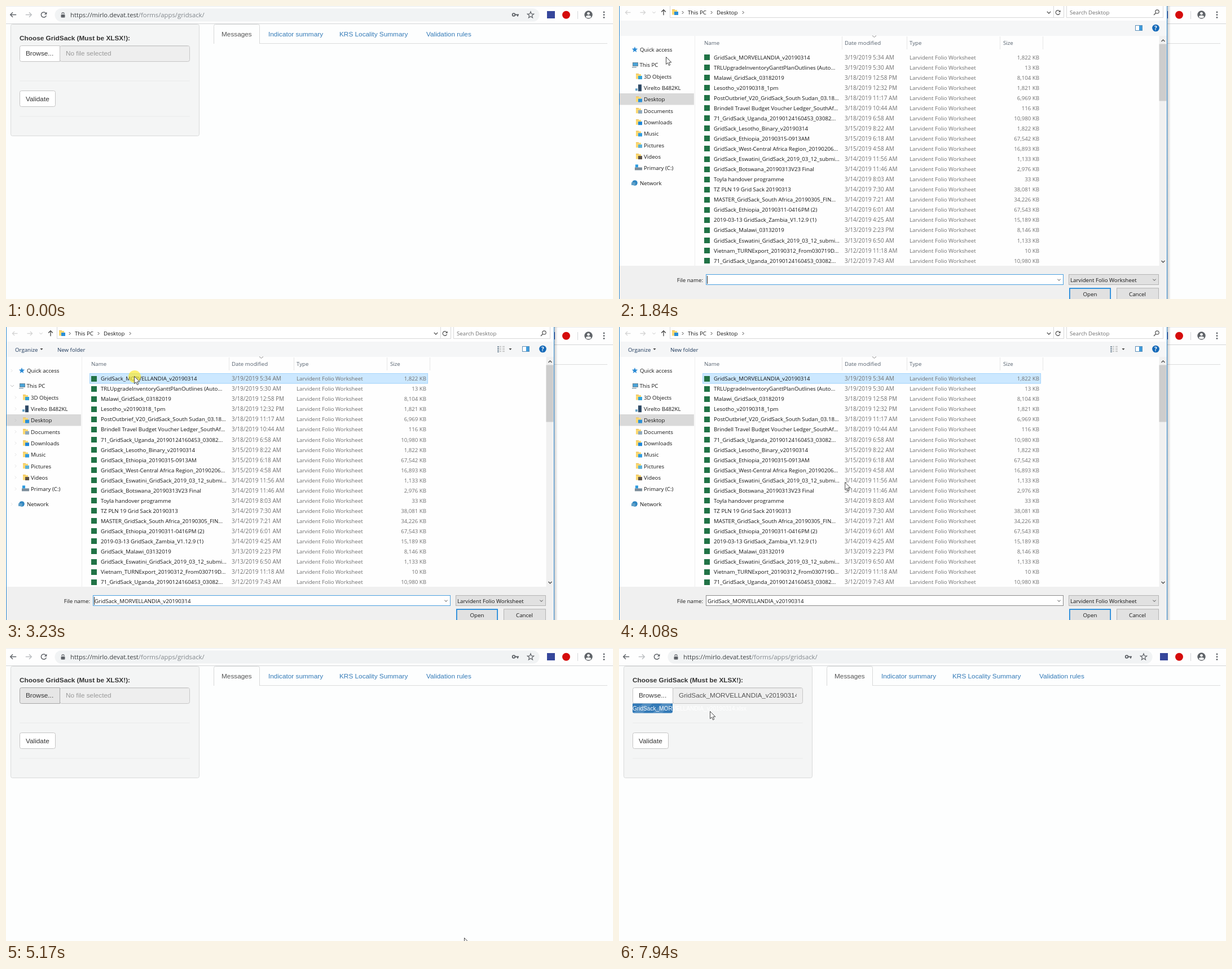
An HTML page with a canvas that plays this animation: 1076 px wide and 520 px high, repeating every 8000 ms.

```html
<!DOCTYPE html>
<html lang="en">
<head>
<meta charset="utf-8">
<title>Upload walkthrough</title>
<style>
html, body { margin: 0; width: 100%; height: 100%; overflow: hidden; background: #fdfefe; }
canvas { display: block; }
</style>
</head>
<body>
<canvas id="stage" width="1076" height="520"></canvas>
<script>
const ctx = document.getElementById('stage').getContext('2d');
const LOOP = 8000;
const ARIAL = '"Liberation Sans", Arial, sans-serif';
const UI = '"Open Sans", "Noto Sans", sans-serif';
const PAGE = '11.8px ' + ARIAL;
const SMALL = '9.7px ' + UI;
const INK = '#161616';
const GREY = '#707070';
const BLUE = '#0078d7';
const FILE = 'GridSack_MORVELLANDIA_v20190314';
const KIND = 'Larvident Folio Worksheet';

const FILES = `${FILE}|3/19/2019 5:34 AM|1,822
TRLUpgradeInventoryGanttPlanOutlines (Auto...|3/19/2019 5:30 AM|13
Malawi_GridSack_03182019|3/18/2019 12:58 PM|8,104
Lesotho_v20190318_1pm|3/18/2019 12:32 PM|1,821
PostOutbrief_V20_GridSack_South Sudan_03.18...|3/18/2019 11:17 AM|6,969
Brindell Travel Budget Voucher Ledger_SouthAf...|3/18/2019 10:44 AM|116
71_GridSack_Uganda_20190124160453_03082...|3/18/2019 6:58 AM|10,980
GridSack_Lesotho_Binary_v20190314|3/15/2019 8:22 AM|1,822
GridSack_Ethiopia_20190315-0913AM|3/15/2019 6:18 AM|67,542
GridSack_West-Central Africa Region_20190206...|3/15/2019 4:58 AM|16,893
GridSack_Eswatini_GridSack_2019_03_12_submi...|3/14/2019 11:56 AM|1,133
GridSack_Botswana_20190313V23 Final|3/14/2019 11:46 AM|2,976
Toyla handover programme|3/14/2019 8:03 AM|33
TZ PLN 19 Grid Sack 20190313|3/14/2019 7:30 AM|38,081
MASTER_GridSack_South Africa_20190305_FIN...|3/14/2019 7:21 AM|34,226
GridSack_Ethiopia_20190311-0416PM (2)|3/14/2019 6:01 AM|67,543
2019-03-13 GridSack_Zambia_V1.12.9 (1)|3/14/2019 4:25 AM|15,189
GridSack_Malawi_03132019|3/13/2019 2:23 PM|8,146
GridSack_Eswatini_GridSack_2019_03_12_submi...|3/13/2019 6:50 AM|1,133
Vietnam_TURNExport_20190312_From030719D...|3/12/2019 11:18 AM|10
71_GridSack_Uganda_20190124160453_03082...|3/12/2019 7:43 AM|10,980`
  .split('\n').map(row => row.split('|'));

const FOLDERS = [
  ['3D Objects', '#35a3d8'], ['Virelto B482KL', '#2f4a66'], ['Desktop', '#2b8fd6'],
  ['Documents', '#8fa9bd'], ['Downloads', '#1f86d8'], ['Music', '#2f9be0'],
  ['Pictures', '#59b0d9'], ['Videos', '#5a5148'], ['Primary (C:)', '#7b8c99']
];

// Drawing helpers
function rect(x, y, w, h, fill, stroke, lw = 1) {
  if (fill) { ctx.fillStyle = fill; ctx.fillRect(x, y, w, h); }
  if (stroke) {
    ctx.strokeStyle = stroke; ctx.lineWidth = lw;
    ctx.strokeRect(x + lw / 2, y + lw / 2, w - lw, h - lw);
  }
}
function round(x, y, w, h, r, fill, stroke) {
  ctx.beginPath();
  ctx.roundRect(x + .5, y + .5, w - 1, h - 1, r);
  if (fill) { ctx.fillStyle = fill; ctx.fill(); }
  if (stroke) { ctx.strokeStyle = stroke; ctx.lineWidth = 1; ctx.stroke(); }
}
function circle(x, y, r, fill, stroke, lw = 1) {
  ctx.beginPath();
  ctx.arc(x, y, r, 0, 7);
  if (fill) { ctx.fillStyle = fill; ctx.fill(); }
  if (stroke) { ctx.strokeStyle = stroke; ctx.lineWidth = lw; ctx.stroke(); }
}
function line(color, lw, ...p) {
  ctx.beginPath();
  for (let i = 0; i < p.length; i += 2) ctx.lineTo(p[i], p[i + 1]);
  ctx.strokeStyle = color; ctx.lineWidth = lw; ctx.stroke();
}
function poly(fill, ...p) {
  ctx.beginPath();
  for (let i = 0; i < p.length; i += 2) ctx.lineTo(p[i], p[i + 1]);
  ctx.closePath();
  ctx.fillStyle = fill; ctx.fill();
}
function text(s, x, y, font, color, align = 'left') {
  ctx.font = font; ctx.fillStyle = color; ctx.textAlign = align;
  ctx.fillText(s, x, y);
}
function clipped(x, y, w, h, draw) {
  ctx.save();
  ctx.beginPath(); ctx.rect(x, y, w, h); ctx.clip();
  draw();
  ctx.restore();
}
function star(x, y, r) {
  ctx.beginPath();
  for (let i = 0; i < 10; i++) {
    const a = -Math.PI / 2 + i * Math.PI / 5, d = i % 2 ? r * .43 : r;
    ctx.lineTo(x + d * Math.cos(a), y + d * Math.sin(a));
  }
  ctx.closePath();
}
const down = (x, y, c, s = 3, lw = 1) => line(c, lw, x - s, y - s / 2, x, y + s / 2, x + s, y - s / 2);
const right = (x, y, c, s = 2.5, lw = 1) => line(c, lw, x - s / 2, y - s, x + s / 2, y, x - s / 2, y + s);
function arrow(x, y, dx, dy, len, c, lw = 1.3) {
  const h = len * .8;
  line(c, lw, x - dx * len, y - dy * len, x + dx * len, y + dy * len);
  const tx = x + dx * len, ty = y + dy * len;
  line(c, lw, tx - dx * h - dy * h, ty - dy * h - dx * h, tx, ty, tx - dx * h + dy * h, ty - dy * h + dx * h);
}
function reload(x, y, r, c, lw) {
  ctx.beginPath(); ctx.arc(x, y, r, .3, 5.5);
  ctx.strokeStyle = c; ctx.lineWidth = lw; ctx.stroke();
  poly(c, x + r + .8, y - r - .5, x + r + .8, y - .4, x + .8, y - .4);
}

// Progress from a to b in n even jumps
function step(t, a, b, n) {
  return t < a ? 0 : Math.min(n, Math.floor((t - a) * (n - 1) / (b - a) + 1.2)) / n;
}
const linear = p => p;
const smooth = p => p * p * (3 - 2 * p);
const easeOut = k => p => 1 - Math.pow(1 - p, k);
const easeIn = k => p => Math.pow(p, k);

// start, end, jumps, goal x and y, easing of x and y
const MOVES = [
  [300, 440, 3, 170, 146, linear, linear],
  [760, 1370, 9, 83, 90, smooth, smooth],
  [2390, 2710, 5, 227, 87, smooth, smooth],
  [4000, 4790, 11, 812, 514, easeOut(1.75), easeOut(2.9)],
  [6630, 7940, 18, 161, 112, easeIn(2.26), easeIn(2.6)]
];
function pointer(t) {
  let x = 577, y = 394;
  for (const [a, b, n, goalX, goalY, easeX, easeY] of MOVES) {
    const p = step(t, a, b, n);
    x += (goalX - x) * easeX(p);
    y += (goalY - y) * easeY(p);
  }
  return { x, y };
}
const inside = (c, x, y, w, h) => c.x >= x && c.x < x + w && c.y >= y && c.y < y + h;

function drawPointer({ x, y }) {
  ctx.beginPath();
  [[0, 0], [0, 13], [3, 10.2], [5, 15], [7.2, 14.1], [5.2, 9.5], [9.3, 9.5]]
    .forEach(([a, b]) => ctx.lineTo(x + a + .5, y + b + .5));
  ctx.closePath();
  ctx.fillStyle = '#fff'; ctx.fill();
  ctx.strokeStyle = '#333'; ctx.lineWidth = .9; ctx.stroke();
}

function browserBar() {
  const ink = '#5f6368';
  rect(0, 0, 1076, 31, '#fefefe');
  rect(0, 0, 1076, 1, '#e9ebed');
  rect(0, 31, 1076, 1, '#d3d5d6');
  arrow(13, 15.5, -1, 0, 5.2, ink, 1.5);
  arrow(40, 15.5, 1, 0, 5.2, '#bcbfc2', 1.5);
  reload(67, 15.5, 4.6, ink, 1.5);
  round(86, 4, 860, 24, 12, '#f1f3f4');
  round(97, 14.5, 8, 6.5, 1, ink);
  ctx.beginPath(); ctx.arc(101, 14, 2.2, Math.PI, 0);
  ctx.strokeStyle = ink; ctx.lineWidth = 1.2; ctx.stroke();
  const font = '11.3px ' + UI, host = 'https://mirlo.devat.test';
  text(host, 114, 20, font, '#3c4043');
  text('/forms/apps/gridsack/', 114 + ctx.measureText(host).width, 20, font, '#80868b');
  circle(900, 15.5, 2.3, null, ink, 1.8);
  line(ink, 2, 902, 15.5, 909, 15.5);
  line(ink, 2, 907, 15.5, 907, 18.5);
  star(930, 16, 6);
  ctx.strokeStyle = ink; ctx.lineWidth = 1.2; ctx.stroke();
  rect(959, 9, 14, 13, '#36479b');
  circle(993, 15.7, 7, '#d50b0b');
  rect(1013, 9, 1, 14, '#d5d7d9');
  circle(1032.5, 15.5, 7.2, ink);
  circle(1032.5, 13.3, 2.4, '#fff');
  ctx.beginPath(); ctx.ellipse(1032.5, 19, 4.4, 2.2, 0, 0, 7);
  ctx.fillStyle = '#fff'; ctx.fill();
  for (let i = 0; i < 3; i++) circle(1060, 11 + i * 4.7, 1.4, ink);
}

function progress(t) {
  const p = step(t, 5790, 7940, 29), now = 5790 + p * 2150;
  const w = p < .38 ? p / .38 * 23 : 23 + (p - .38) / .62 * 48;
  const label = () => text(FILE + '.xlsx', 24, 110.5, '10.1px ' + ARIAL, '#fff');
  label();
  ctx.save();
  ctx.beginPath(); ctx.roundRect(24, 98.5, w, 17, [0, 0, 3, 3]); ctx.clip();
  rect(24, 98, w, 18, '#337ab7');
  const shift = 34 - now / 2000 * 34 % 34;
  for (let x = -34; x < w + 40; x += 34) {
    const s = 24 + x + shift;
    poly('rgba(255,255,255,.15)', s, 116, s + 17, 116, s + 35, 98, s + 18, 98);
  }
  label();
  ctx.restore();
}

function page(t, c) {
  rect(0, 0, 1076, 520, '#fdfefe');
  browserBar();
  round(8, 32, 335, 199, 3, '#f4f5f5', '#d9dada');
  text('Choose GridSack (Must be XLSX!):', 24, 61, 'bold ' + PAGE, '#333');

  round(95, 70, 231, 29, 3, '#eeeeee', '#c6c6c6');
  rect(96, 71, 229, 1, '#dfdfdf');
  const loaded = t >= 5400;
  clipped(96, 70, 219, 29, () =>
    text(loaded ? FILE + '.xlsx' : 'No file selected', 106, 88, PAGE, loaded ? '#555' : '#999'));

  const hot = t < 1690 ? inside(c, 24, 70, 71, 29) : t < 6630;
  round(24, 70, 72, 29, [3, 0, 0, 3], hot ? '#e6e6e6' : '#fff', hot ? '#a6a6a6' : '#c4c4c4');
  text('Browse...', 35, 88, PAGE, '#333');
  if (t >= 5790) progress(t);

  rect(24, 132.5, 302, 1, '#ececec');
  rect(24, 195.5, 302, 1, '#ececec');
  round(24, 150, 64, 29, 3, '#fff', '#c4c4c4');
  text('Validate', 35, 168.7, PAGE, '#333');

  rect(368, 66, 698, 1, '#dcdddd');
  round(368, 32, 82, 40, 3, '#fdfefe', '#d7d8d8');
  rect(367, 67, 84, 6, '#fdfefe');
  text('Messages', 382, 53.7, PAGE, '#555');
  text('Indicator summary', 465, 53.7, PAGE, '#337ab7');
  text('KRS Locality Summary', 591, 53.7, PAGE, '#337ab7');
  text('Validation rules', 745, 53.7, PAGE, '#337ab7');
}

function folder(x, y, accent) {
  rect(x, y - 5, 5, 2, '#e9b949');
  rect(x, y - 4, 9, 8.5, '#fbd871');
  rect(x + 4, y - 1, 7, 6, accent);
}

function tree(alpha) {
  const item = (s, x, y) => text(s, x, y + 3.7, SMALL, INK);
  rect(1, 155, 132, 20.5, '#d9d9d9');
  star(28, 77.5, 5.5);
  ctx.fillStyle = '#2a8ad4'; ctx.fill();
  item('Quick access', 37, 77.5);
  rect(24, 100, 10, 7, '#4aa3d8', '#6c8797');
  rect(23, 108, 8, 1.5, '#8ea3b0');
  item('This PC', 36.5, 104.5);
  FOLDERS.forEach(([name, color], i) => {
    const y = 125 + i * 20.3;
    if (i === 1) { rect(34, y - 6, 6, 12, color); rect(29, y + 1, 4, 4, '#68a4c8'); }
    else if (i === 8) { rect(28, y - 1, 13, 5, color); rect(29, y - 6, 5, 5, '#2b9be0'); }
    else folder(30, y, color);
    item(name, 44, y);
  });
  circle(28, 314, 4.8, '#2f86c2');
  rect(22, 313, 7, 5, '#5f9fc7');
  item('Network', 37, 314.5);
  if (alpha <= 0) return;
  ctx.globalAlpha = alpha;
  right(10, 77.5, '#a6a6a6');
  down(11, 104.5, '#333');
  FOLDERS.forEach((f, i) => right(17, 125 + i * 20.3, '#a6a6a6'));
  right(10, 314.5, '#a6a6a6');
  ctx.globalAlpha = 1;
}

function fileList(t, c) {
  [395, 510, 675, 751].forEach(x => rect(x, 54, 1, 23, '#e6e6e6'));
  [['Name', 151], ['Date modified', 400], ['Type', 515], ['Size', 681]]
    .forEach(([s, x]) => text(s, x, 69, SMALL, '#56626f'));
  line('#8a8a8a', 1, 449, 52.5, 452.5, 55.5, 456, 52.5);
  const shift = t < 1930 ? 0 : .6;
  if (t >= 3230) rect(148, 82, 600, 18.5, '#cce8ff', '#a6d5fb');
  else if (inside(c, 148, 82, 600, 18.5)) rect(148, 82, 600, 18.5, '#e5f3ff');
  FILES.forEach(([name, date, size], i) => {
    const y = 91 + shift + i * 18.05, b = y + 3.6;
    rect(151, Math.round(y - 5), 10, 10, '#217346');
    clipped(148, y - 9, 243, 18, () => text(name, 168, b, SMALL, INK));
    text(date, 400, b, '10px ' + UI, GREY);
    text(KIND, 515, b, SMALL, GREY);
    text(size + ' KB', 745, b, SMALL, GREY, 'right');
  });
}

function addressBar() {
  arrow(16, 11.5, -1, 0, 4.5, '#d2d2d2');
  arrow(42, 11.5, 1, 0, 4.5, '#d2d2d2');
  down(62, 11.5, '#c4c4c4', 2.5);
  arrow(79, 11.5, 0, -1, 4.8, '#444');
  rect(90, -2, 699, 23, '#fff', '#d9d9d9');
  folder(94, 11, '#2b8fd6');
  [113, 164, 220].forEach(x => right(x, 11.5, '#444'));
  text('This PC', 122, 15, SMALL, INK);
  text('Desktop', 173, 15, SMALL, INK);
  down(762, 11.5, '#444', 3.2, 1.3);
  rect(770, 0, 1, 20, '#d9d9d9');
  reload(778, 11.5, 3.8, '#555', 1.2);
  rect(793, -2, 172, 23, '#fff', '#d9d9d9');
  text('Search Desktop', 799, 15, SMALL, GREY);
  circle(954, 10, 3.2, null, '#555', 1.2);
  line('#555', 1.4, 951.5, 12.5, 948, 16);
}

function toolbar(t) {
  rect(1, 26, 970, 27, '#f5f6f7');
  if (t >= 1930) {
    text('Organize', 16, 43.5, SMALL, '#1e395b');
    poly('#444', 60.5, 38, 65.5, 38, 63, 41);
    text('New folder', 91, 43.5, SMALL, '#1e395b');
    for (let i = 0; i < 4; i++) {
      rect(871, 34 + i * 3, 3, 2, '#8597a5');
      rect(875, 34 + i * 3, 3, 1, '#aaa');
      rect(880, 34 + i * 3, 4, 1, '#aaa');
    }
    poly('#444', 891.5, 38, 896.5, 38, 894, 41);
  }
  rect(915, 34, 13, 10, '#fff', '#5b8fb9');
  rect(922, 35, 5, 8, '#3e9bdc');
  circle(951.5, 39, 6.3, '#1469b8');
  text('?', 951.5, 42.8, 'bold 10px ' + UI, '#fff', 'center');
}

function footer(t) {
  rect(1, 461, 970, 59, '#f0f0f0');
  text('File name:', 149, 489.5, SMALL, INK, 'right');
  rect(154, 476, 634, 19, '#fff', t < 3310 ? '#4a9fe0' : '#8a8a8a');
  if (t >= 3230) text(FILE, 157, 489.7, SMALL, INK);
  if (t < 2390 || (t >= 2930 && t < 3310)) rect(156, 479, 1, 14, '#222');
  down(780, 486, '#444', 2.6);
  rect(797, 476, 160, 19, '#e1e1e1', '#b4b4b4');
  text(KIND, 800, 489.5, SMALL, INK);
  down(949, 486, '#444', 2.6);
  rect(798, 500.3, 74, 30, '#e1e1e1', '#1a86db', 1.7);
  const hover = step(t, 4790, 4950, 3);
  if (hover) {
    ctx.globalAlpha = hover;
    rect(799, 501, 72, 30, '#e5f1fb', BLUE);
    ctx.globalAlpha = 1;
  }
  text('Open', 835, 514.7, SMALL, INK, 'center');
  rect(882, 500.3, 75, 30, '#e1e1e1', '#b4b4b4');
  text('Cancel', 919, 514.7, SMALL, INK, 'center');
}

function dialog(t, c) {
  const shade = ctx.createLinearGradient(972, 0, 978, 0);
  shade.addColorStop(0, 'rgba(0,0,0,.2)');
  shade.addColorStop(1, 'rgba(0,0,0,0)');
  rect(972, 0, 6, 520, shade);
  rect(0, 0, 972, 520, '#fefefe');
  addressBar();
  toolbar(t);
  if (t >= 1840) {
    rect(134, 53, 1, 408, '#eeeeee');
    const fade = t < 2000 ? 0 : 1 - step(t, 2700, 3460, 10);
    tree(fade);
    fileList(t, c);
    rect(957.5, 53, 13.5, 408, '#f0f0f0');
    rect(957.5, 67.5, 13, 101, '#cdcdcd');
    line('#505050', 1.4, 961.5, 63, 964.5, 60, 967.5, 63);
    line('#505050', 1.4, 961.5, 452, 964.5, 455, 967.5, 452);
  }
  footer(t);
  rect(0, 0, 1, 520, '#2f8ad0');
  rect(971, 0, 1, 520, '#2f8ad0');
}

const CLICKS = [[1690, 1770], [3230, 3390], [5090, 5170]];

function draw(t) {
  const c = pointer(t);
  page(t, c);
  if (t >= 1770 && t < 5170) dialog(t, c);
  if (CLICKS.some(([a, b]) => t >= a && t < b)) circle(c.x + 1, c.y + 1, 11, 'rgba(250,232,40,.66)');
  if (t >= 300) drawPointer(c);
}

function frame(now) {
  draw(now % LOOP);
  requestAnimationFrame(frame);
}
requestAnimationFrame(frame);
</script>
</body>
</html>
```
